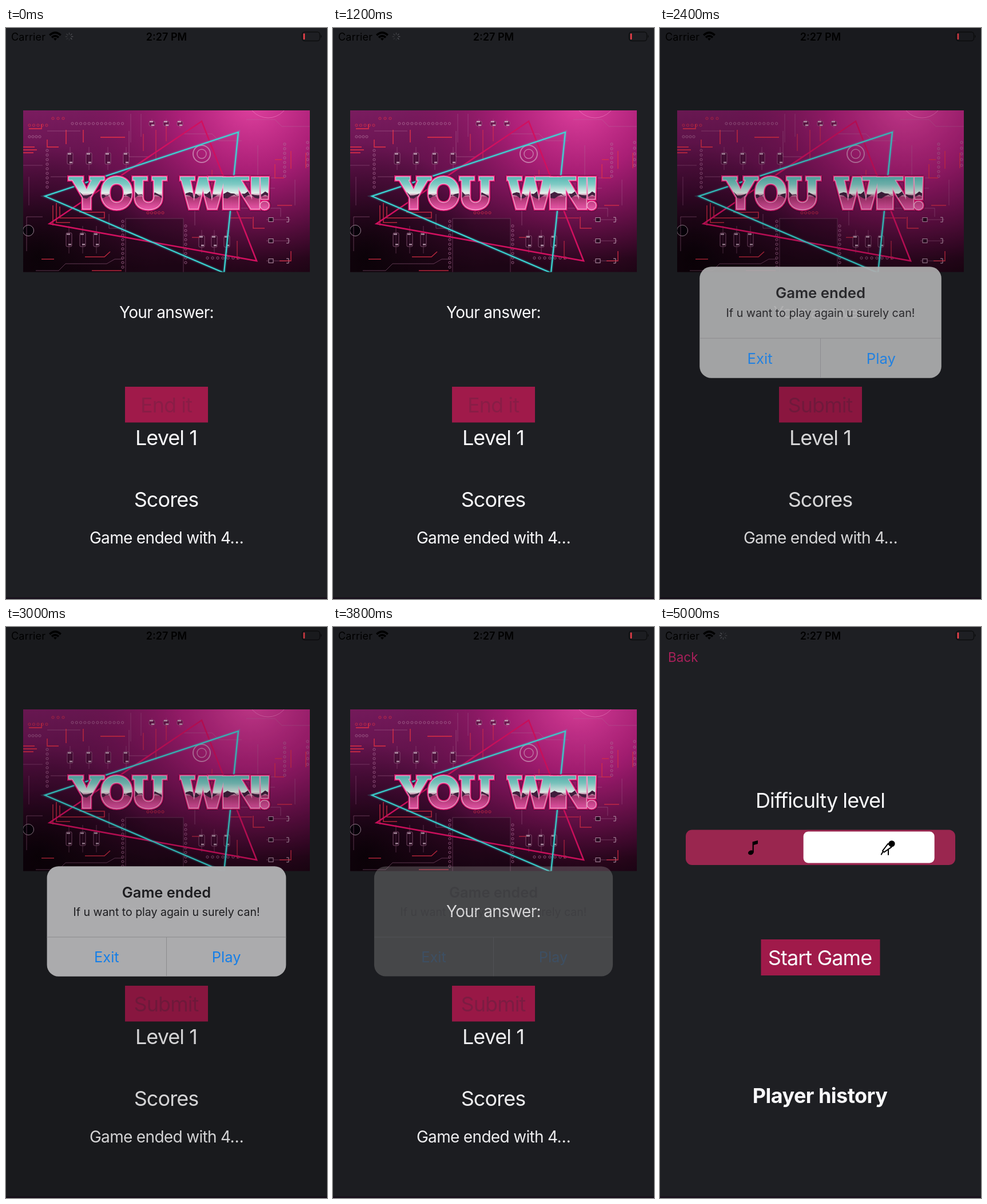
An HTML page for the animation above (5.1 s loop, 561 by 998 pixels).

```html
<!DOCTYPE html>
<html lang="en">
<head>
<meta charset="utf-8">
<title>Game end</title>
<style>
html, body { margin: 0; width: 100%; height: 100%; overflow: hidden; background: #1e1f23; }
svg { display: block; width: 100%; height: 100%; }
text { font-family: Inter, "Liberation Sans", sans-serif; white-space: pre; }
.label { fill: #f8f8fa; text-anchor: middle; letter-spacing: -.026em; }
.big { font-size: 36px; }
.mid { font-size: 28px; letter-spacing: -.024em; }
.bold { font-weight: 700; letter-spacing: -.015em; }
.faint { fill: #5f2440; }
.alert text { text-anchor: middle; font-size: 25.4px; fill: #1b1b1e; }
.alert .act { fill: #137ee8; }
.win text { font-weight: 800; font-size: 76px; }
</style>
</head>
<body>
<svg id="stage" viewBox="0 0 561 998">
  <defs>
    <linearGradient id="base" x1="0" y1="0" x2=".1" y2="1">
      <stop offset="0" stop-color="#7a1c5f"/>
      <stop offset=".5" stop-color="#5a0e45"/>
      <stop offset="1" stop-color="#1e0515"/>
    </linearGradient>
    <radialGradient id="glow" gradientUnits="userSpaceOnUse" cx="430" cy="130" r="310">
      <stop offset="0" stop-color="#e0429f"/>
      <stop offset=".4" stop-color="#bd2281" stop-opacity=".78"/>
      <stop offset="1" stop-color="#7a0e54" stop-opacity="0"/>
    </radialGradient>
    <radialGradient id="shade" gradientUnits="userSpaceOnUse" cx="55" cy="400" r="200">
      <stop offset="0" stop-color="#080206" stop-opacity=".9"/>
      <stop offset="1" stop-color="#080206" stop-opacity="0"/>
    </radialGradient>
    <linearGradient id="chrome" gradientUnits="userSpaceOnUse" x1="0" y1="258" x2="0" y2="319">
      <stop offset="0" stop-color="#4fb5b0"/>
      <stop offset=".25" stop-color="#7fcac4"/>
      <stop offset=".5" stop-color="#e6f0ec"/>
      <stop offset=".62" stop-color="#a8346f"/>
      <stop offset="1" stop-color="#f05aae"/>
    </linearGradient>
    <clipPath id="photo"><rect x="30" y="144" width="501" height="282.5"/></clipPath>
    <clipPath id="letters" class="win">
      <text x="112" y="316" letter-spacing="-.02em">YOU</text>
      <text x="304" y="316" letter-spacing="-.115em">WIN!</text>
    </clipPath>
  </defs>

  <rect width="561" height="998" fill="#1e1f23"/>

  <g id="game">
    <g clip-path="url(#photo)">
      <rect x="30" y="144" width="501" height="283" fill="url(#base)"/>
      <rect x="30" y="144" width="501" height="283" fill="url(#glow)"/>
      <rect x="30" y="144" width="501" height="283" fill="url(#shade)"/>
      <g id="board"></g>
      <g fill="none" stroke-linejoin="miter">
        <path d="M342 163L76 342L438 407Z" stroke="#d0105f" stroke-width="2.6"/>
        <path d="M406 182L68 294L381 428Z" stroke="#35d6d6" stroke-width="6" opacity=".18"/>
        <path d="M406 182L68 294L381 428Z" stroke="#3bd9d6" stroke-width="2.2"/>
      </g>
      <g class="win" id="title"></g>
    </g>
    <text class="label mid" x="280.5" y="507">Your answer:</text>
    <rect x="208" y="627" width="145" height="62.5" fill="#a01a4a"/>
    <text class="label big faint" id="endIt" x="280" y="672">End it</text>
    <text class="label big faint" id="submit" x="280" y="672">Submit</text>
    <text class="label big" x="280" y="729">Level 1</text>
    <text class="label big" x="280" y="837">Scores</text>
    <text class="label mid" x="280.5" y="901">Game ended with 4…</text>
  </g>

  <g id="menu">
    <text x="14" y="61" font-size="22.5" fill="#a8205a">Back</text>
    <text class="label big" x="280" y="316">Difficulty level</text>
    <rect x="45" y="354.5" width="471" height="61.5" rx="11" fill="#9a264f"/>
    <rect id="thumb" x="48" y="357.5" width="229" height="55" rx="8.5" fill="#fff"/>
    <g id="note">
      <ellipse cx="158.8" cy="394.3" rx="4.9" ry="3.9" transform="rotate(-20 158.8 394.3)"/>
      <path d="M161.6 375.5L171 373V379L163.8 381V394H161.6Z"/>
    </g>
    <g id="mic" stroke="#000" stroke-linecap="round" fill="none">
      <circle cx="405" cy="378.8" r="5.6" fill="#000" stroke="none"/>
      <path d="M398.6 378.6L389 391.2L391.6 393.6L404.6 384.6Z" stroke-width="1.9" stroke-linejoin="round"/>
      <path d="M389.6 392.8L386.8 397.6M399 388.5V398" stroke-width="2"/>
    </g>
    <rect x="176.5" y="546" width="208" height="63" fill="#a01a4a"/>
    <text class="label big" x="279.5" y="591">Start Game</text>
    <text class="label big bold" x="279.5" y="831.5">Player history</text>
  </g>

  <g id="status">
    <text x="9" y="22" font-size="18" letter-spacing=".2">Carrier</text>
    <g fill="none" stroke="#000" stroke-width="3.6">
      <path d="M76.3 12.6Q86 3.8 95.7 12.6M80 16.6Q86 11.2 92 16.6"/>
      <path d="M83 18.6Q86 16.2 89 18.6L86 22Z" fill="#000" stroke="none"/>
    </g>
    <g id="spinner" stroke="#55565b" stroke-width="1.3" stroke-linecap="round"></g>
    <text x="280.5" y="22" font-size="18" font-weight="600" text-anchor="middle">2:27 PM</text>
    <rect x="517.5" y="7" width="31" height="15.5" rx="4.5" fill="none" stroke="#000" stroke-opacity=".55" stroke-width="1.5"/>
    <path d="M550 12Q553.5 14.7 550 17.5Z" fill-opacity=".55"/>
    <rect x="519.6" y="9.4" width="2.7" height="10.8" rx="1.2" fill="#f0404a"/>
  </g>

  <rect y="995.5" width="561" height="2.5" fill="#170f1b"/>
  <rect id="dim" width="561" height="998" fill="#000"/>

  <g id="alert" class="alert">
    <rect id="panel" x="72" y="418.5" width="417" height="192" rx="20" fill="#aeaeb0"/>
    <g id="content">
      <path d="M72 542H489M280.5 542V610.5" stroke="#8b8b8e" stroke-width="1" fill="none"/>
      <text x="280.5" y="473" font-weight="600">Game ended</text>
      <text x="280.5" y="505" style="font-size:19.5px">If u want to play again u surely can!</text>
      <text class="act" x="176" y="586">Exit</text>
      <text class="act" x="385" y="586">Play</text>
    </g>
  </g>
</svg>

<script>
const LOOP = 5100, STEP = 100;
const $ = id => document.getElementById(id);
const clamp = v => Math.max(0, Math.min(1, v));
const ramp = (t, a, b) => clamp((t - a) / (b - a));
const fade = (id, v) => $(id).setAttribute('opacity', v.toFixed(3));

// circuit board
const GREY = '#b0709a', RED = '#e03048';
const dots = (x, y, n, dx, dy, color = GREY) => Array.from({ length: n }, (_, i) =>
  `<circle cx="${x + i * dx}" cy="${y + i * dy}" r="2.1" fill="none" stroke="${color}" stroke-width=".9" opacity=".8"/>`).join('');
const trace = (d, color, w = 1.2, o = .8) =>
  `<path d="${d}" fill="none" stroke="${color}" stroke-width="${w}" opacity="${o}"/>`;
const part = (x, y, h) =>
  trace(`M${x} ${y - h}V${y + h}`, GREY, .8, .5) +
  `<rect x="${x - 5}" y="${y - h * .5}" width="10" height="${h}" rx="2" fill="#2a0821" fill-opacity=".4" stroke="#a0688c" stroke-width=".7"/>` +
  `<path d="M${x - 4} ${y - h * .4}h6M${x - 1} ${y + h * .35}h5" stroke="#e0c4d6" stroke-width="2.4" opacity=".75"/>`;
const chip = (x, y) => trace(`M${x - 8} ${y}H${x + 34}`, GREY, .9, .5) +
  `<rect x="${x - 4}" y="${y - 3.5}" width="8" height="7" fill="#2a0a22" stroke="#c0a0b4" stroke-width=".9"/>` +
  `<path d="M${x + 27} ${y - 4}h4v8h-4" fill="none" stroke="#c0a0b4"/>`;

function board() {
  let s = '<rect x="209" y="333" width="101" height="100" fill="#1a0514" fill-opacity=".4" stroke="#6a3a5a" stroke-width=".8"/>';
  for (const x of [112, 145, 178, 210]) s += part(x, 228, 20);
  for (const x of [110, 134, 158]) s += part(x, 370, 24);
  for (const x of [342, 364, 386]) s += part(x, 373, 20);
  for (const x of [255, 280, 304]) s += part(x, 167, 8);
  for (const y of [335, 372, 407]) s += chip(463, y);
  s += dots(116, 167, 13, 7.3, 0) + dots(41, 170, 5, 7.5, 0, RED) + dots(41, 190, 4, 6, 0)
    + dots(72, 214, 9, 0, 8) + dots(487, 203, 8, 0, 8) + dots(527, 200, 5, 0, 10)
    + dots(204, 338, 11, 0, 8) + dots(314, 346, 9, 0, 8)
    + dots(248, 323, 5, 6.5, 0, RED) + dots(352, 402, 7, 9, 0) + dots(82, 158, 3, 9, 0, RED);
  s += '<circle cx="342" cy="220" r="15" fill="none" stroke="#c478a8" stroke-width="2"/>'
    + '<circle cx="342" cy="220" r="8" fill="none" stroke="#c478a8" stroke-width="1.5"/>'
    + '<circle cx="39" cy="354" r="9.5" fill="#08020a" stroke="#9a8292" stroke-width="1"/>'
    + '<circle cx="458" cy="120" r="37" fill="none" stroke="#f080c4" opacity=".6"/>';
  s += trace('M30 208H50M30 213H54M30 218H48M72 195V208H92M40 176H62V168M105 178V203M135 178V200M165 191H208', RED, 1.8, .8)
    + trace('M82 310V345M88 306V340H112M94 312V332H172V322H128M62 404H84M138 400H172L182 391M150 424H202', RED, 1.5, .8)
    + trace('M470 230H482M470 238V262H486M498 215V246M524 218V245M474 310H500M432 330V350H452M498 390V407H478', RED, 1.5, .8)
    + trace('M240 185V215M262 178V232M280 172V198M360 248V284M392 332H430M404 372V405M325 366H338', RED, 1.4, .65)
    + trace('M72 180H130M215 180V225H250M78 260H112M36 390V330H64M52 424H92L104 412H176L190 404H204', GREY, .9, .55)
    + trace('M310 185H360L372 197H412M440 205V262H470M410 280H470M330 300V345M396 315H480V330M180 325V350H204', GREY, .9, .5)
    + trace('M30 240H64M40 260V310M218 150V200M236 150V190M420 160H470L482 172H531M505 265V310', GREY, .9, .45);
  return s;
}

// chrome lettering with short slabs on the upright tops
function title() {
  const slabs = [110, 147, 222, 256, 305, 354, 400].map(x => `M${x} 260.5h24v5h-24z`).join('');
  const words = attr => `<g ${attr}><path d="${slabs}"/><text x="112" y="316" letter-spacing="-.02em">YOU</text>` +
    `<text x="304" y="316" letter-spacing="-.115em">WIN!</text></g>`;
  let drip = 'M105 291';
  for (let x = 105; x <= 465; x += 6) drip += `L${x} ${(290 + 3.2 * Math.sin(x * .19) + 2 * Math.sin(x * .47)).toFixed(1)}`;
  drip += 'V295';
  for (let x = 465; x >= 105; x -= 6) drip += `L${x} ${(295 + 3.5 * Math.sin(x * .23 + 1)).toFixed(1)}`;
  return words('fill="none" stroke="#2b0522" stroke-width="8" stroke-linejoin="round" opacity=".5"')
    + words('fill="none" stroke="#e01b77" stroke-width="6"')
    + words('fill="none" stroke="#f3b3d3" stroke-width="2.4"')
    + words('fill="url(#chrome)"')
    + `<path d="${drip}Z" fill="#43203f" clip-path="url(#letters)"/>`;
}

$('board').innerHTML = board();
$('title').innerHTML = title();
$('spinner').innerHTML = Array.from({ length: 8 }, (_, i) =>
  `<path d="M110.5 11.2V8.6" transform="rotate(${i * 45} 110.5 15)"/>`).join('');
const spokes = [...$('spinner').children];

function draw(t) {
  // one overdamped spring drives the alert's scale, opacity and the dimming
  const rest = Math.exp(-Math.max(0, t - 1600) / 310);
  const shown = (1 - rest) * (1 - ramp(t, 3600, 3880));
  const scale = 1 + .174 * rest;
  $('alert').setAttribute('transform', `translate(280.5 514.5) scale(${scale.toFixed(4)}) translate(-280.5 -514.5)`);
  fade('panel', shown);
  fade('content', Math.pow(shown, 1.45));
  fade('dim', .15 * shown);

  const swap = ramp(t, 1600, 2000);
  fade('endIt', .35 * (1 - swap));
  fade('submit', .45 * swap);

  const menu = t >= 3900;
  fade('game', menu ? 0 : 1);
  fade('menu', menu ? 1 : 0);

  const u = Math.max(0, t - 4700) * .0115;
  const slide = 1 - (1 + u) * Math.exp(-u);
  $('thumb').setAttribute('x', (48 + 236 * slide).toFixed(2));

  fade('spinner', t < 1500 || menu ? 1 : 0);
  const turn = t >= 4700 ? Math.floor((t - 4600) / 100) : 0;
  spokes.forEach((s, i) => s.setAttribute('opacity', .25 + .1 * ((i - turn + 12) % 8)));
}

function tick() {
  draw(Math.floor(performance.now() % LOOP / STEP) * STEP);
  requestAnimationFrame(tick);
}
tick();
</script>
</body>
</html>
```
